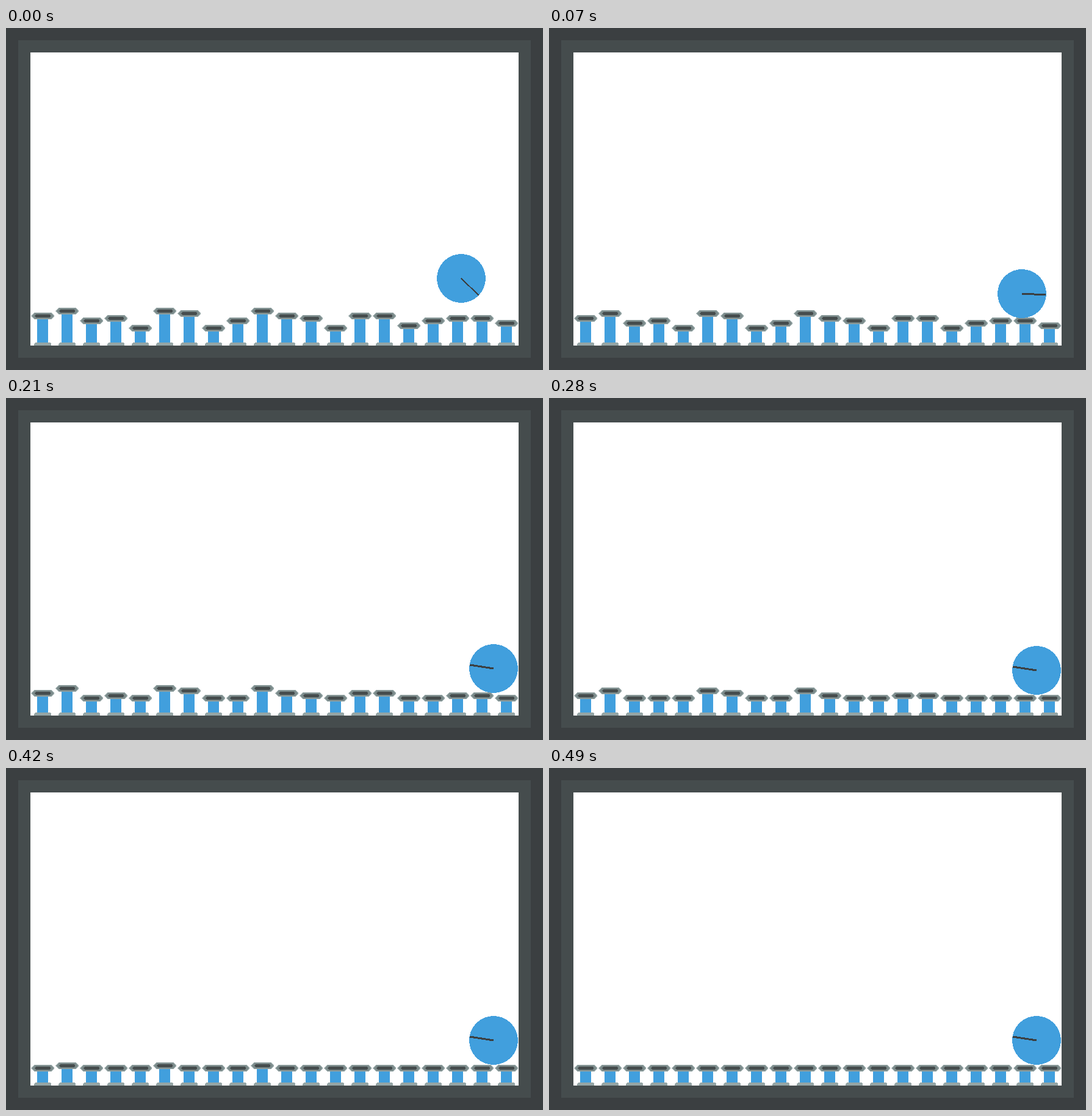
These frames come from a looping animation (880 by 560 pixels, 8.82 s). An HTML page:

```html
<!DOCTYPE html>
<html lang="en">
<head>
<meta charset="utf-8">
<title>Pistons and ball</title>
<style>
  html, body { margin: 0; width: 100%; height: 100%; overflow: hidden; background: #3b3f41; }
  svg { display: block; }
</style>
</head>
<body>
<svg width="880" height="560" viewBox="0 0 880 560" shape-rendering="crispEdges">
  <defs>
    <g id="cap">
      <path fill="#95a5a5" d="M-19 0 L-14 -5 H14 L19 0 V1 L14 6 H-14 L-19 1 Z"/>
      <path fill="#7b8a8a" d="M-17 0 L-13 -4 H13 L17 0 V1 L13 5 H-13 L-17 1 Z"/>
      <path fill="#454c4d" d="M-13 0 L-11 -2 H11 L13 0 V1 L11 3 H-11 L-13 1 Z"/>
    </g>
    <path id="base" fill="#95a5a5" d="M-14 520 V517 L-12 515 H12 L14 517 V520 Z"/>
  </defs>
  <rect width="880" height="560" fill="#3b3f41"/>
  <rect x="20" y="20" width="840" height="520" fill="#454c4d"/>
  <rect x="40" y="40" width="800" height="480" fill="#fff"/>
  <g id="pistons"></g>
  <g id="ball">
    <circle r="40" fill="#419fdd"/>
    <line id="hand" stroke="#3b3f41"/>
  </g>
</svg>
<script>
const LOOP = 8820, STEP = 70, LAST = 7;
const REST_Y = 491, DROP = 4;
const lifts = [5, 7, 3, 4, 0, 7, 6, 0, 3, 7, 5, 4, 0, 5, 5, 1, 3, 4, 4, 2];

// Ball centre, hand tip relative to it, hand width
const rolling = [
  { x: 746, y: 410, hx: 29, hy: 28, w: 2 },
  { x: 775, y: 435, hx: 39, hy: 2, w: 3 }
];
const settled = { x: 799, hx: -39, hy: -6, w: 3 };

const $ = id => document.getElementById(id);

function add(parent, name, attrs) {
  const el = document.createElementNS("http://www.w3.org/2000/svg", name);
  setAll(el, attrs);
  return parent.appendChild(el);
}

function setAll(el, attrs) {
  for (const key in attrs) el.setAttribute(key, attrs[key]);
}

const pistons = lifts.map((lift, i) => {
  const g = add($("pistons"), "g", { transform: `translate(${60 + 40 * i} 0)` });
  const rod = add(g, "rect", { x: -9, width: 18, fill: "#419fdd" });
  add(g, "use", { href: "#base" });
  const cap = add(g, "use", { href: "#cap" });
  return { lift, rod, cap };
});

function ballAt(step) {
  return rolling[step] || { ...settled, y: Math.min(446, 439 + DROP * (step - 2)) };
}

function draw(time) {
  const step = Math.min(LAST, Math.floor((time % LOOP) / STEP));
  for (const { lift, rod, cap } of pistons) {
    const y = REST_Y - DROP * Math.max(0, lift - step);
    setAll(rod, { y, height: 516 - y });
    setAll(cap, { y });
  }
  const b = ballAt(step);
  setAll($("ball"), { transform: `translate(${b.x} ${b.y})` });
  setAll($("hand"), { x2: b.hx, y2: b.hy, "stroke-width": b.w });
}

const start = performance.now();
function tick() {
  draw(performance.now() - start);
  requestAnimationFrame(tick);
}
tick();
</script>
</body>
</html>
```
